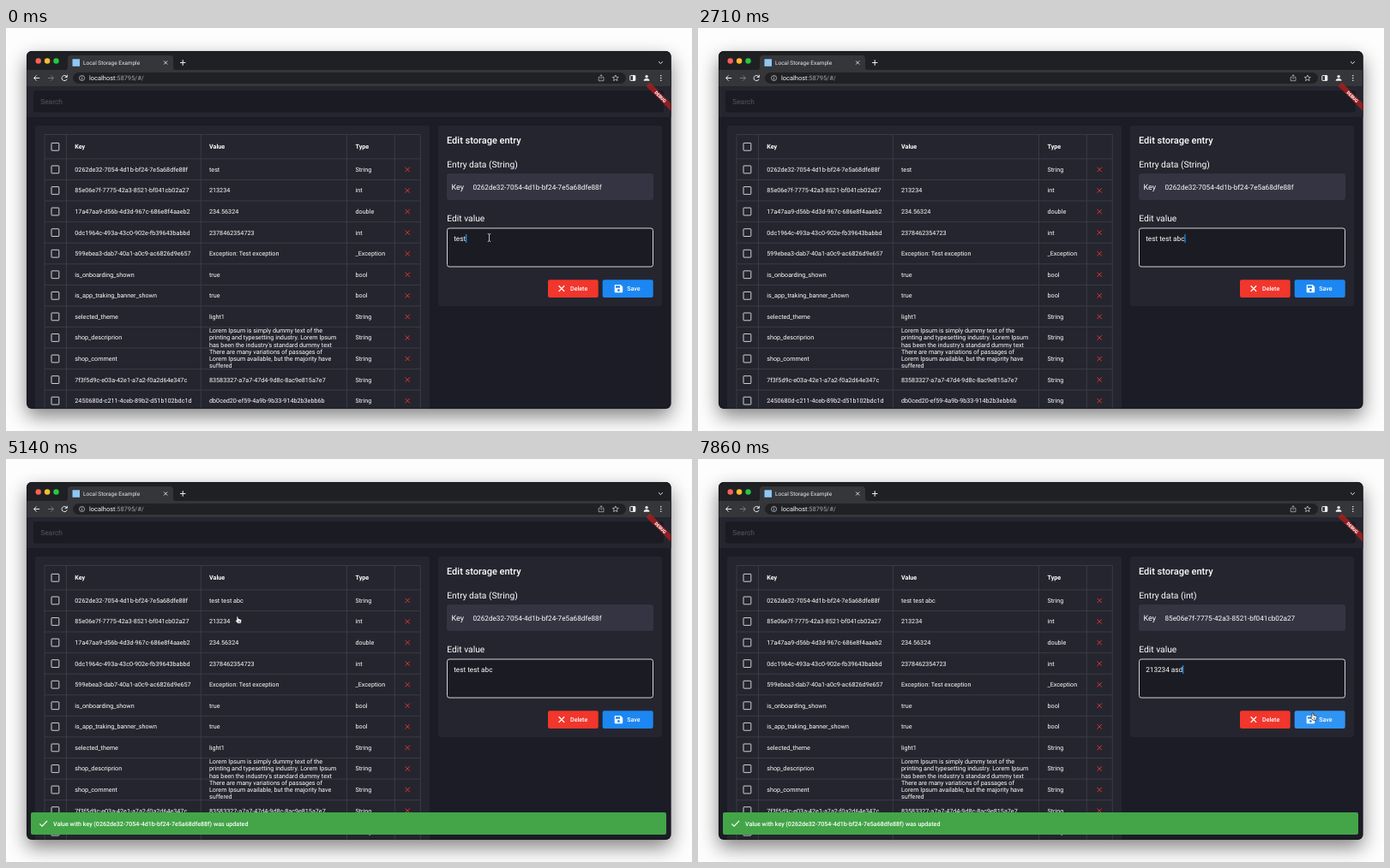
An HTML page that plays this animation: 800 by 471 pixels, repeating every 8 s.

```html
<!DOCTYPE html>
<html lang="en">
<head>
<meta charset="utf-8">
<title>Local Storage Example</title>
<style>
html, body { margin: 0; width: 100%; height: 100%; overflow: hidden; background: #fefdfe; }
svg { display: block; width: 100vw; height: 100vh; }
text { font-family: Roboto, Arial, sans-serif; white-space: pre; text-rendering: geometricPrecision; }
.window { filter: drop-shadow(0 9px 11px rgba(0, 0, 0, .48)); }
</style>
</head>
<body>
<svg id="stage" viewBox="0 0 800 471" xmlns="http://www.w3.org/2000/svg"></svg>
<script>
const FPS = 7, FRAMES = 56;
const rect = (x, y, w, h, fill, r = 0, more = '') =>
  `<rect x="${x}" y="${y}" width="${w}" height="${h}" rx="${r}" fill="${fill}" ${more}/>`;
const text = (x, y, s, size = 7.2, weight = 400, fill = '#fff', more = '') =>
  `<text x="${x}" y="${y}" font-size="${size}" font-weight="${weight}" fill="${fill}" ${more}>${s}</text>`;
const line = (d, color = '#fff', w = 1, more = '') =>
  `<path d="${d}" fill="none" stroke="${color}" stroke-width="${w}" ${more}/>`;
const shape = (d, fill, more = '') => `<path d="${d}" fill="${fill}" ${more}/>`;
const dot = (x, y, r, fill, more = '') => `<circle cx="${x}" cy="${y}" r="${r}" fill="${fill}" ${more}/>`;
const cross = (x, y, r, color, w) =>
  line(`M${x - r} ${y - r}l${2 * r} ${2 * r}m0 ${-2 * r}l${-2 * r} ${2 * r}`, color, w);

const firstKey = '0262de32-7054-4d1b-bf24-7e5a68dfe88f';
const secondKey = '85e06e7f-7775-42a3-8521-bf041cb02a27';
const rows = [
  [firstKey, 'test', 'String'],
  [secondKey, '213234', 'int'],
  ['17a47aa9-d56b-4d3d-967c-686e8f4aaeb2', '234.56324', 'double'],
  ['0dc1964c-493a-43c0-902e-fb39643babbd', '2378462354723', 'int'],
  ['599ebea3-dab7-40a1-a0c9-ac6826d9e657', 'Exception: Test exception', '_Exception'],
  ['is_onboarding_shown', 'true', 'bool'],
  ['is_app_traking_banner_shown', 'true', 'bool'],
  ['selected_theme', 'light1', 'String'],
  ['shop_descriprion', 'Lorem Ipsum is simply dummy text of the|printing and typesetting industry. Lorem Ipsum|has been the industry\'s standard dummy text', 'String'],
  ['shop_comment', 'There are many variations of passages of|Lorem Ipsum available, but the majority have|suffered', 'String'],
  ['7f3f5d9c-e03a-42e1-a7a2-f0a2d64e347c', '83583327-a7a7-47d4-9d8c-8ac9e815a7e7', 'String'],
  ['2450680d-c211-4ceb-89b2-d51b102bdc1d', 'db0ced20-ef59-4a9b-9b33-914b2b3ebb6b', 'String'],
];

function browserBar() {
  const grey = '#c4c5c9';
  return rect(24, 27, 752, 42, '#1f2024')
    + shape('M69 49q3 0 3-3V36q0-4 4-4H191q4 0 4 4V46q0 3 3 3z', '#35363a')
    + rect(24, 49, 752, 19, '#35363a') + rect(78, 52, 645, 13, '#202124', 6.5)
    + dot(37.7, 38.5, 3.2, '#fe5f57') + dot(48.1, 38.5, 3.2, '#febc2e') + dot(58.5, 38.5, 3.2, '#28c840')
    + rect(77.5, 36.3, 8.5, 8.5, '#8fc8f3')
    + text(90, 42.9, 'Local Storage Example', 6.5, 400, '#e8e9ec')
    + cross(186.2, 40.5, 2, '#e8e9ec', .9)
    + line('M203 40.5h6.4M206.2 37.3v6.4', '#e8e9ec', 1.1)
    + line('M761 39.3l2.4 2.3 2.4-2.3', '#e8e9ec', 1)
    + line('M39.2 58.5h-6.6m3-3l-3 3 3 3', '#e8e9ec', 1)
    + line('M48.8 58.5h6.6m-3-3l3 3-3 3', '#77787d', 1)
    + line('M71 57.2A3.1 3.1 0 1 0 71.1 59.7M71.3 54.8v2.6h-2.6', '#e8e9ec', 1)
    + dot(88.6, 58.5, 3, 'none', `stroke="${grey}" stroke-width=".8"`)
    + line('M88.6 56.6v.9M88.6 58.2v2.1', grey, .9)
    + text(97, 61, 'localhost<tspan fill="#a2a4a9">:58795/#/</tspan>', 7.45, 400, '#f1f2f4')
    + line('M692.6 57.5h-1.4v4.2h5.8v-4.2h-1.4M694.1 59.8v-5m-1.6 1.5l1.6-1.6 1.6 1.6', grey, .7)
    + line('M710.8 55l1 2.3 2.5.2-1.9 1.6.6 2.5-2.2-1.3-2.2 1.3.6-2.5-1.9-1.6 2.5-.2z', grey, .8)
    + rect(727.8, 55.6, 6, 5.8, 'none', .6, 'stroke="#eee" stroke-width="1"') + rect(731, 55.4, 3, 6.2, '#eee')
    + dot(747.1, 56.7, 1.7, '#eee') + shape('M743.7 61.8q0-2.8 3.4-2.8t3.4 2.8z', '#eee')
    + [55.8, 58.5, 61.2].map(y => dot(763.8, y, .8, '#eee')).join('');
}

function table() {
  const grid = '#3d3e48', head = 138.8;
  const check = y => rect(53, y - 4.4, 8.8, 8.8, 'none', .6, 'stroke="#e4e4e8" stroke-width=".9"');
  let out = line('M45 460V124.5H483.3V460M70.5 124.5V460M227.3 124.5V460M397.5 124.5V460M453.3 124.5V460', grid, .9)
    + check(head)
    + text(80.3, 141.3, 'Key', 7.2, 700) + text(237, 141.3, 'Value', 7.2, 700) + text(407.5, 141.3, 'Type', 7.2, 700);
  rows.forEach(([key, value, type], i) => {
    const y = 165.4 + 24.57 * i, base = y + 2.5, parts = value.split('|');
    out += line(`M45 ${y - 12.5}H483.3`, grid, .9) + check(y)
      + text(80.3, base, key) + text(407.5, base, type) + cross(468.2, y, 2.6, '#e5342c', 1);
    parts.forEach((s, n) => {
      out += text(237, base + (n - (parts.length - 1) / 2) * 8.2, s, 7.2, 400, '#fff', i ? '' : 'id="saved"');
    });
  });
  return out;
}

function editor() {
  return rect(504, 114, 261, 211, '#25252f', 3)
    + text(514, 134.8, 'Edit storage entry', 11, 500)
    + text(514.3, 163, '', 10.25, 400, '#fff', 'id="kind"')
    + rect(514, 170, 241, 31, '#343442', 3)
    + text(519.5, 189, 'Key', 9, 400) + text(544.5, 188.8, '', 8.2, 400, '#fff', 'id="key"')
    + text(514.3, 226.3, 'Edit value', 10.25)
    + rect(514.5, 234, 240, 45, '#1b1b24', 2.5, 'stroke="#e6e6ea" stroke-width=".9"')
    + text(522.2, 248.8, '', 8.2, 400, '#fff', 'id="value"')
    + rect(0, 241, 1.1, 10, '#2196f3', 0, 'id="caret"')
    + rect(632, 294.3, 58.7, 20.6, '#f1362c', 2, 'id="delete"') + cross(647.9, 304.6, 3.3, '#fff', 1.3)
    + text(658, 307.2, 'Delete', 7.1, 500)
    + rect(695.7, 294.3, 59, 20.6, '#1c87f2', 2, 'id="save"')
    + shape('M710.7 300h6l2.5 2.5v5.7q0 1-1 1h-7.5q-1 0-1-1v-7.2q0-1 1-1zM711 301.2v2.6h5v-2.6zM714.4 305.1a1.5 1.5 0 1 0 .01 0z',
      '#fff', 'fill-rule="evenodd"')
    + text(724.2, 307.2, 'Save', 7.1, 500);
}

const pointers = {
  beam: line('M-1.7-4.5q1.7 0 1.7 1.2v6.6q0 1.2-1.7 1.2M1.7-4.5q-1.7 0-1.7 1.2m0 6.6q0 1.2 1.7 1.2', '#d5d5da', .9),
  hand: shape('M-2-3.8q.9-.9 1.6 0l.5 2.6 1.6.1 1.5.7q.7.5.5 1.8l-.7 2.8h-4L-3.6.9q0-1.1 1-.7l.5.5z',
    '#fff', 'stroke="#111" stroke-width=".7"') + line('M.3 1v1.8M1.6 1v1.8', '#111', .5),
  arrow: shape('M-2.5-4.5v8.2l1.9-1.8 1.3 2.9 1.3-.6L.7 1.4h2.6z', '#000', 'stroke="#fff" stroke-width=".7"'),
};

const stage = document.getElementById('stage');
stage.innerHTML = `<defs><clipPath id="frame">${rect(24, 27, 751.5, 418, '#000', 6)}</clipPath></defs>`
  + `<g class="window">${rect(24, 27, 751.5, 418, '#1c1c26', 6)}</g><g clip-path="url(#frame)">`
  + browserBar()
  + rect(24, 68, 752, 36, '#25252f') + rect(32, 73, 735, 25.5, '#1b1b24', 3)
  + text(40.2, 88.7, 'Search', 8.4, 400, '#55565e')
  + rect(34, 114, 460, 350, '#25252f', 3) + table() + editor()
  + '<g transform="translate(775.5 68) rotate(45)">' + rect(-20.5, 14.3, 41, 6.2, '#b71c1c', 0, 'opacity=".75"')
  + text(0, 19.3, 'DEBUG', 5.2, 900, '#fff', 'text-anchor="middle"') + '</g>'
  + '<g id="snack">' + rect(29, 413, 741, 26, '#43a547', 2) + line('M39.3 426.3l2.8 2.8 6-6.3', '#fff', 1.2)
  + text(55, 428.7, `Value with key (${firstKey}) was updated`, 7.1, 500) + '</g></g>'
  + rect(24.3, 27.3, 750.9, 417.4, 'none', 6, 'stroke="#000" stroke-opacity=".5" stroke-width=".6"')
  + '<g id="pointer">' + Object.entries(pointers).map(([k, v]) => `<g id="${k}">${v}</g>`).join('') + '</g>';

const el = id => document.getElementById(id);
const clamp = (v, lo, hi) => Math.min(hi, Math.max(lo, v));
const show = (node, on) => node.setAttribute('opacity', +on);

// pointer path: step, x, y
const path = [
  [0, 563.5, 245], [20, 563.5, 245], [23, 655, 298], [24, 680, 305], [25, 697, 307], [27, 718, 306], [31, 718, 306],
  [36, 271, 188], [38, 271, 185], [39, 279, 216], [41, 279, 216], [43, 560, 250], [51, 560, 250],
  [53, 690, 290], [54, 714, 303], [55, 718, 301],
];
function pointerAt(f) {
  const i = Math.max(1, path.findIndex(p => p[0] >= f)), [a, ax, ay] = path[i - 1], [b, bx, by] = path[i];
  const k = (f - a) / (b - a);
  return [ax + (bx - ax) * k, ay + (by - ay) * k];
}

function draw(f) {
  const second = f >= 38;
  el('saved').textContent = f >= 28 ? 'test test abc' : 'test';
  el('kind').textContent = `Entry data (${second ? 'int' : 'String'})`;
  el('key').textContent = second ? secondKey : firstKey;
  el('value').textContent = second
    ? '213234 asd'.slice(0, 6 + clamp(f - 44, 0, 4))
    : 'test test abc'.slice(0, 4 + clamp(f - 6, 0, 5) + clamp(f - 14, 0, 4));

  const typing = (f > 6 && f < 12) || (f > 14 && f < 19) || (f > 43 && f < 49);
  const lastEdit = f > 43 ? 48 : f > 14 ? 18 : f > 6 ? 11 : 0;
  const focused = f < 27 || f > 42;
  show(el('caret'), focused && (typing || (f - lastEdit) % 7 < 4));
  el('caret').setAttribute('x', 522.2 + el('value').getComputedTextLength());

  const [x, y] = pointerAt(f);
  const inside = (l, t, r, b) => x > l && x < r && y > t && y < b;
  const kind = inside(514, 234, 755, 279) ? 'beam'
    : inside(632, 294, 691, 315) || inside(695, 294, 755, 315) || inside(45, 152, 483, 412) ? 'hand' : 'arrow';
  for (const k in pointers) show(el(k), k === kind);
  show(el('pointer'), !((f > 6 && f < 20) || (f > 44 && f < 51)));
  el('pointer').setAttribute('transform', `translate(${x} ${y})`);

  el('delete').setAttribute('fill', f > 22 && f < 26 ? '#f6463c' : '#f1362c');
  el('save').setAttribute('fill', f > 26 && f < 31 ? '#58aaf7' : inside(700, 294, 755, 315) ? '#3094f5' : '#1c87f2');
  show(el('snack'), clamp((f - 27) / 2, 0, 1));
}

function tick() {
  draw(Math.floor((performance.now() + 5) * FPS / 1000) % FRAMES);
  requestAnimationFrame(tick);
}
tick();
</script>
</body>
</html>
```
